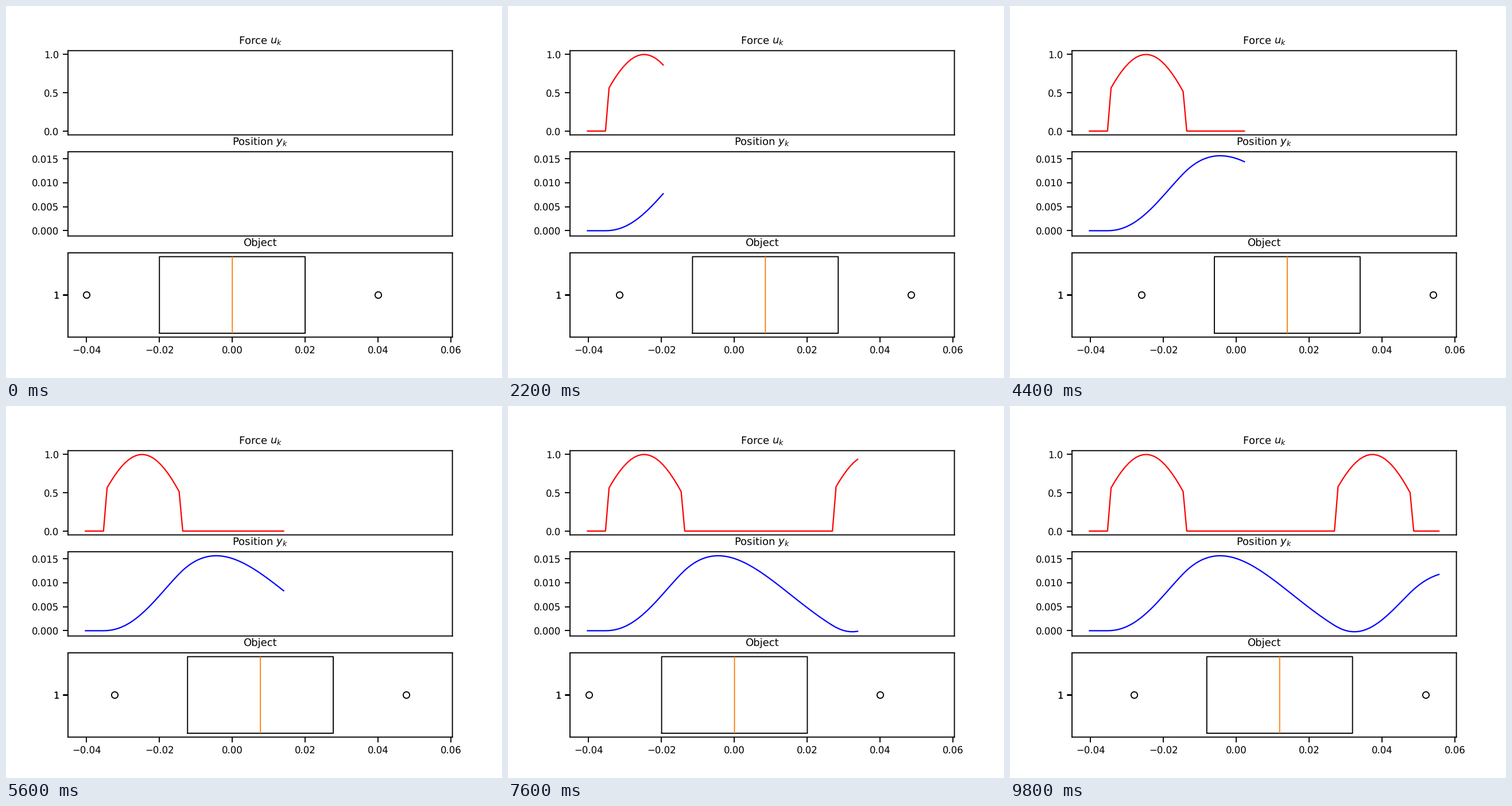
Recreate the animation shown at these times as a matplotlib script. Size 864 by 648 pixels, loop 10 s.

```python
import numpy as np
import matplotlib.pyplot as plt
from matplotlib.animation import ArtistAnimation

FRAMES, INTERVAL = 50, 200
STEPS = 2 * FRAMES
GAIN, DECAY, OMEGA = 9.95e-5, 0.025, 0.0578
Y_MIN, Y_MAX = -0.0003, 0.01563

plt.rcParams.update({
    "font.family": "DejaVu Sans",
    "text.hinting": "none",
    "path.snap": False,
    "axes.linewidth": 1.0,
    "axes.titlesize": 9.6,
    "lines.linewidth": 1.2,
    "xtick.labelsize": 8.8,
    "ytick.labelsize": 8.8,
    "xtick.major.size": 4.8,
    "ytick.major.size": 4.8,
    "xtick.major.width": 1.0,
    "ytick.major.width": 1.0,
})


def pulses(k):
    """Sine force that only acts above half its amplitude."""
    wave = np.sin(0.1 * k)
    return np.where(wave > 0.5, wave, 0.0)


def respond(force):
    """Damped oscillator driven by a force held over each step."""
    t = np.arange(len(force)) + 0.5
    impulse = GAIN * np.exp(-DECAY * t) * np.sin(OMEGA * t) / OMEGA
    return np.convolve(force, impulse)[:len(force)]


def padded(lo, hi):
    pad = 0.05 * (hi - lo)
    return lo - pad, hi + pad


def draw_object(ax, y):
    stats = dict(med=y, q1=y - 0.02, q3=y + 0.02,
                 whislo=y - 0.02, whishi=y + 0.02,
                 fliers=[y - 0.04, y + 0.04])
    parts = ax.bxp([stats], vert=False, widths=1,
                   showcaps=False, manage_ticks=False)
    return parts["boxes"] + parts["medians"] + parts["fliers"]


steps = np.arange(STEPS)
force = pulses(steps)
position = respond(force)

fig, (ax_force, ax_pos, ax_obj) = plt.subplots(3, 1, figsize=(6.4, 4.8), dpi=135)

scenes = []
for i in range(FRAMES):
    n = 2 * i
    scene = ax_force.plot(steps[:n], force[:n], color="r")
    scene += ax_pos.plot(steps[:n], position[:n], color="b")
    scene += draw_object(ax_obj, position[n])
    scenes.append(scene)

# Whiskers have no length here, so keep them out of every scene.
kept = {artist for scene in scenes for artist in scene}
for line in ax_obj.lines:
    if line not in kept:
        line.set_visible(False)

ax_force.set_title("Force $u_k$")
ax_pos.set_title("Position $y_k$")
ax_obj.set_title("Object")

for ax in (ax_force, ax_pos):
    ax.set_xticks([])
    ax.set_xlim(*padded(0, STEPS - 3))

ax_force.set_yticks([0, 0.5, 1])
ax_force.set_ylim(*padded(0, 1))
ax_pos.set_yticks(np.arange(4) * 0.005)
ax_pos.set_ylim(*padded(Y_MIN, Y_MAX))
ax_obj.set_xticks(np.arange(-2, 4) * 0.02)
ax_obj.set_xlim(*padded(Y_MIN - 0.04, Y_MAX + 0.04))
# The doubled tick gives the slightly heavier label.
ax_obj.set_yticks([1, 1], ["1", "1"])
ax_obj.tick_params(axis="y", width=1.45)
ax_obj.set_ylim(*padded(0.5, 1.5))

anim = ArtistAnimation(fig, scenes, interval=INTERVAL, repeat=True, repeat_delay=0)
plt.show()
```
